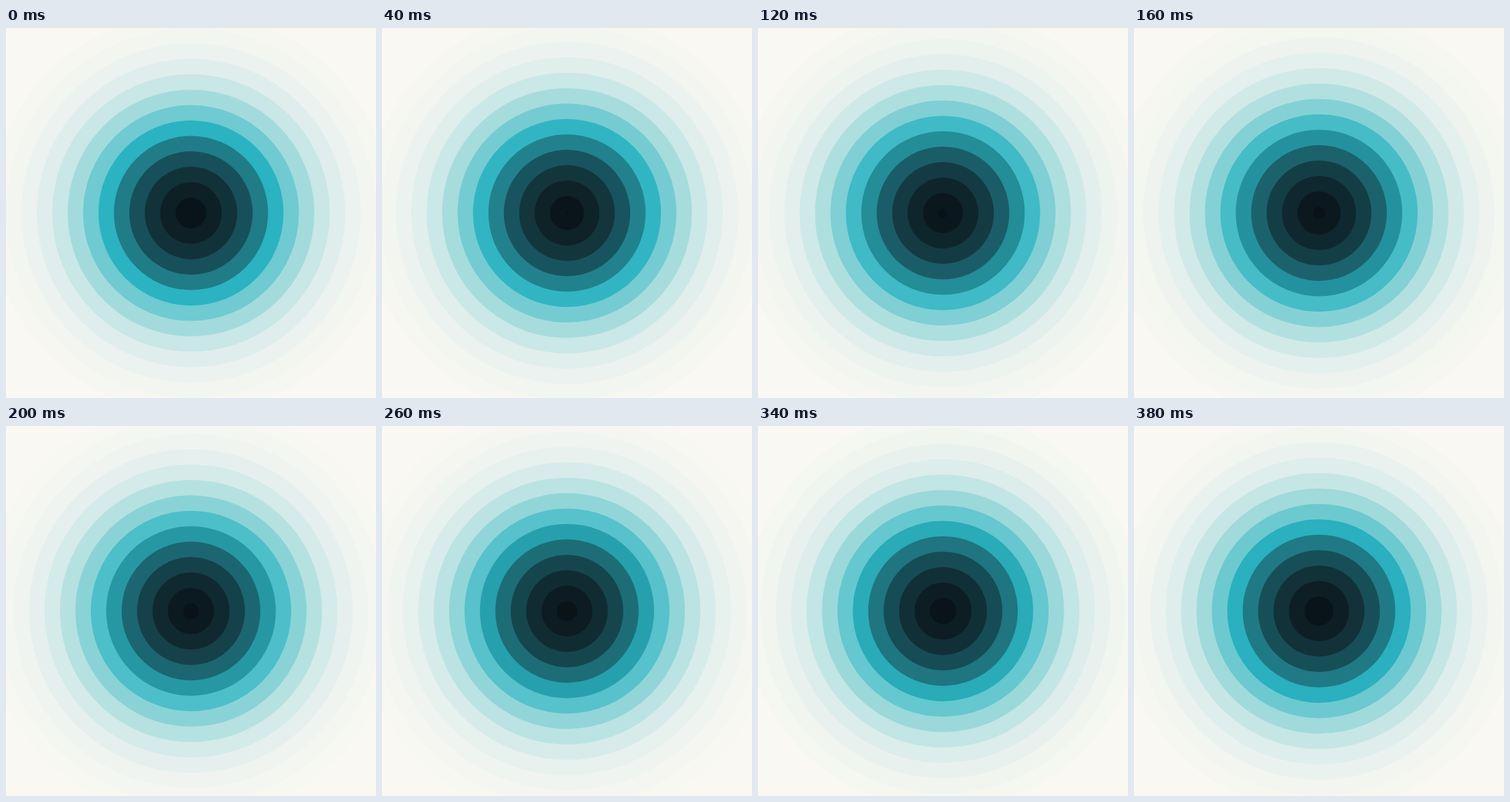
Write an HTML page that moves like this. It is 540 px wide and 540 px high and loops after 0.4 s.

```html
<!DOCTYPE html>
<html lang="en">
<head>
<meta charset="utf-8">
<title>Expanding rings</title>
<style>
  html, body { margin: 0; width: 100%; height: 100%; overflow: hidden; background: #faf8f2; }
  svg { display: block; width: 100%; height: 100%; }
</style>
</head>
<body>
<svg id="stage" viewBox="0 0 540 540"></svg>
<script>
const LOOP = 400, STEP = 20, GAP = 22.5;

// Disc colours at radius 0, GAP, 2 * GAP, ...
const palette = [
  '081015', '09141a', '0d2026', '123239', '17505a', '207c87', '2bb3c1',
  '6fcad1', 'a3dbdc', 'c8e7e6', 'dfeeec', 'ebf2ef', 'f2f5f0', 'f6f7f1',
  'f9f8f2', 'faf8f2'
].map(hex => [0, 2, 4].map(i => parseInt(hex.slice(i, i + 2), 16)));

const stage = document.getElementById('stage');
const discs = [];

// Largest disc first, so smaller ones lie on top
for (let k = palette.length - 2; k >= 0; k--) {
  const disc = document.createElementNS('http://www.w3.org/2000/svg', 'circle');
  disc.setAttribute('cx', 270);
  disc.setAttribute('cy', 270);
  stage.appendChild(disc);
  discs[k] = disc;
}

function mix(a, b, p) {
  return `rgb(${a.map((v, i) => Math.round(v + (b[i] - v) * p)).join(',')})`;
}

function render(ms) {
  const p = Math.floor((ms % LOOP) / STEP) * STEP / LOOP;
  discs.forEach((disc, k) => {
    disc.setAttribute('r', GAP * (k + p));
    disc.setAttribute('fill', mix(palette[k], palette[k + 1], p));
  });
}

const start = performance.now();

function tick() {
  render(performance.now() - start);
  requestAnimationFrame(tick);
}

render(0);
requestAnimationFrame(tick);
</script>
</body>
</html>
```
